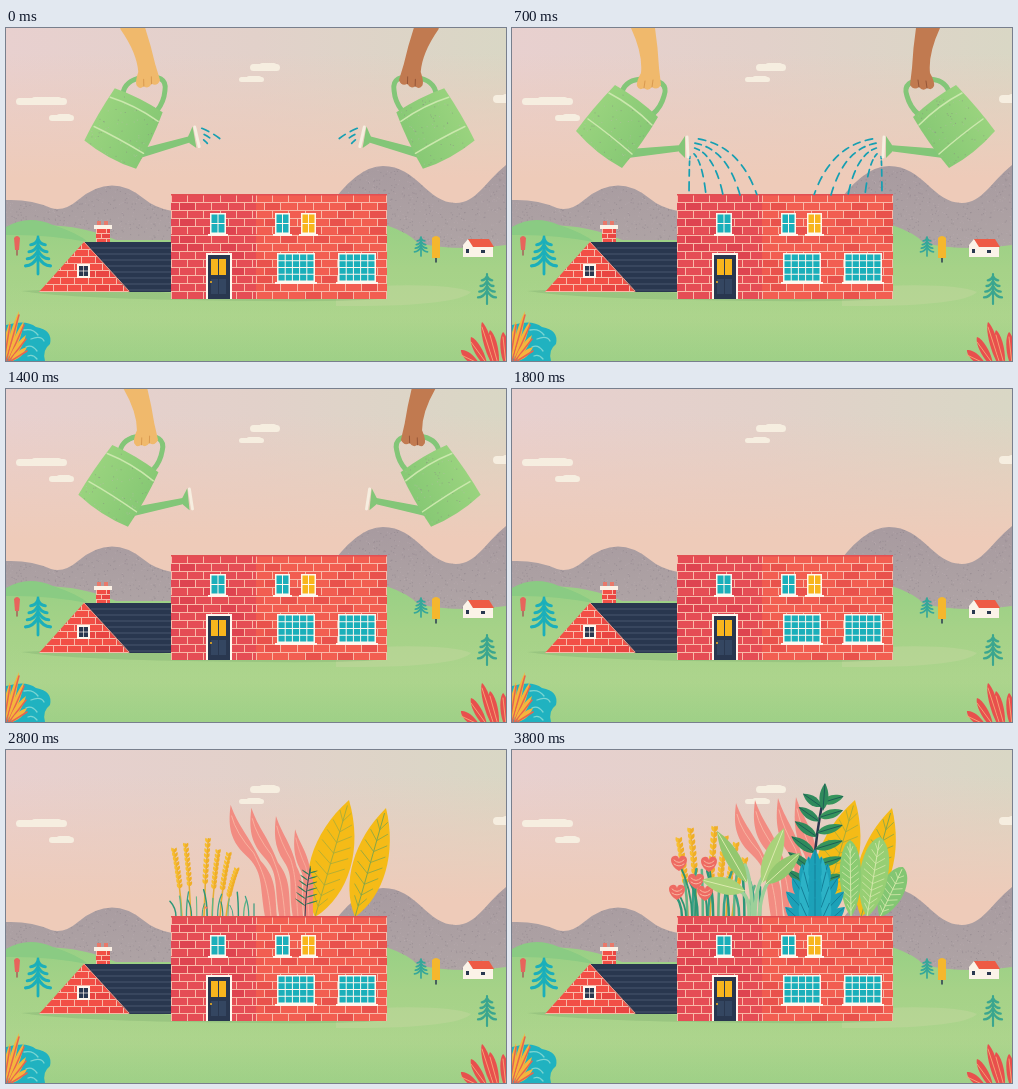
These frames come from a looping animation (500x333 px, 5.8 s). An HTML page with a canvas:

```html
<!DOCTYPE html>
<html lang="en">
<head>
<meta charset="utf-8">
<title>Rooftop garden</title>
<style>
html, body { margin: 0; width: 100%; height: 100%; overflow: hidden; }
canvas { display: block; width: 500px; height: 333px; }
</style>
</head>
<body>
<canvas id="stage" width="500" height="333"></canvas>
<script>
const c = document.getElementById('stage').getContext('2d');
const LOOP = 5800, STEP = 100, ROOF = 167;
const TEAL = '#1bafba', NAVY = '#29374f', CREAM = '#f6eee0', RED = '#f04a43';
let seed = 1;
const rand = () => (seed = seed * 16807 % 2147483647) / 2147483647;

const fill = (d, color) => { c.fillStyle = color; c.fill(new Path2D(d)); };
const line = (d, color, w = 1) => {
  c.strokeStyle = color; c.lineWidth = w; c.lineCap = 'round'; c.stroke(new Path2D(d));
};
const rect = (x, y, w, h, color) => { c.fillStyle = color; c.fillRect(x, y, w, h); };
const group = fn => { c.save(); fn(); c.restore(); };
const gradient = (x0, y0, x1, y1, ...stops) => {
  const g = c.createLinearGradient(x0, y0, x1, y1);
  stops.forEach((s, i) => g.addColorStop(i / (stops.length - 1), s));
  return g;
};
const grain = (d, x, y, w, h, n) => group(() => {
  c.clip(new Path2D(d));
  for (let i = 0; i < n; i++)
    rect(x + rand() * w, y + rand() * h, 1, 1, rand() < .5 ? '#c3b5b866' : '#83798266');
});

// ---- Landscape ----
function clouds() {
  for (const [x, y, w, h] of [[10, 69, 51, 8], [43, 86, 25, 7], [244, 35, 30, 8], [233, 48, 25, 6], [487, 66, 30, 9]]) {
    c.fillStyle = CREAM;
    c.beginPath();
    c.roundRect(x, y + 1, w, h - 1, h / 2);
    c.roundRect(x + w * .3, y, w * .6, h - 1, h / 2);
    c.fill();
  }
}

function pine(x, top, h, w, color = TEAL) {
  line(`M${x} ${top}V${top + h}`, color, w / 11 + .5);
  for (let i = 1; i < 5; i++) {
    const y = top + h * (.02 + i * .19), r = w * (.22 + i * .07);
    line(`M${x - r} ${y}Q${x - r * .4} ${y} ${x} ${y - r * .75}Q${x + r * .4} ${y} ${x + r} ${y}`, color, w / 9 + .3);
  }
}

function landscape() {
  rect(0, 0, 500, 333, gradient(0, 0, 500, 0, '#e8d0cf', '#e2d1ca', '#d9d7c5'));
  rect(0, 0, 500, 333, gradient(0, 25, 0, 150, '#eecbba00', '#eecbba88', '#eecbb9'));
  clouds();

  const hills = 'M0 172Q25 171 45 180Q58 184 72 172Q105 144 137 170Q149 180 166 183H320Q350 138 377 138C411 138 421 175 450 175C470 175 478 155 500 137V235H0Z';
  fill(hills, gradient(0, 140, 0, 225, '#a89ba0', '#afa4a5'));
  grain(hills, 0, 137, 500, 95, 2600);

  fill('M0 201Q60 190 110 212H380V197Q403 205 412 215Q450 224 500 217V333H0Z',
    gradient(0, 195, 0, 333, '#98d085', '#a6d288', '#a9d48b', '#9fd087'));
  fill('M0 199Q22 186 47 197Q72 205 82 214Q40 206 0 207Z', '#8acb83');
  rect(0, 200, 500, 133, gradient(0, 255, 0, 333, '#b5d59000', '#b5d59055', '#a4d28a00'));
  fill('M330 260Q440 253 465 264Q450 279 330 278Z', '#c3d69f77');
  fill('M15 263Q90 257 165 265L381 270Q350 275 180 272Q60 270 15 263Z', '#7fae7066');

  line('M11 215V227', '#a65f57', 1.5);
  fill('M8 210Q11 206 14 210L13 222H9Z', '#e7645c');
  pine(32, 209, 37, 25);
  pine(415, 209, 19, 13, '#35a79a');
  pine(481, 246, 30, 18, '#3ba68f');
  line('M430 225V234', NAVY, 1.5);
  fill('M426 210Q430 206 434 210V230H426Z', '#f5b72d');

  fill('M457 229V217L462 211L467 217H487V229Z', '#fbf3e8');
  fill('M462 211H483L488 219H467Z', '#ee5b45');
  rect(460, 221, 3, 4, NAVY);
  rect(475, 222, 4, 3, NAVY);

  fill('M0 297Q20 291 30 299Q47 302 44 316Q36 322 39 333H0Z', '#20b2c0');
  line('M18 302Q27 300 32 307M25 311Q35 307 38 313M20 319Q26 316 31 323M22 328Q27 326 31 331', '#7bd5d2', 1.3);
  for (const [x, y, lean] of [[13, 283, 13], [18, 293, 16], [20, 307, 17], [21, 319, 16], [4, 293, 6]]) {
    leaf(x - lean, 333, x, y, 5, '#f5b53c');
    line(`M${x - lean} 333L${x} ${y + 4}`, '#e7644f', 1.5);
  }
  for (const [x, y, b] of [[476, 294, 488], [484, 302, 492], [465, 309, 481], [497, 304, 500], [455, 322, 474]]) {
    leaf(b, 339, x, y, 7, '#e8504d', null, 0, .85);
    line(`M${b} 336L${x} ${y + 5}`, '#f4a073');
  }
}

// ---- House ----
function bricks(d, color, x0, y0, w, h, row) {
  group(() => {
    c.clip(new Path2D(d));
    rect(x0, y0, w, h, color);
    for (let r = 0; r * row < h; r++) {
      const y = Math.round(y0 + r * row);
      for (let x = x0 + (r % 2 ? row : 0); x < x0 + w; x += row * 2) {
        rect(x, y, row * 2, row, rand() < .2 ? '#c8304030' : '#ff806018');
        rect(Math.round(x), y, 1, row, '#f9b9a8');
      }
      rect(x0, y, w, 1, '#f9b9a8');
    }
  });
}

function pane(x, y, w, h, cols, rows, color) {
  rect(x, y, w, h, '#fff7ee');
  const pw = (w - 2) / cols, ph = (h - 2) / rows;
  for (let i = 0; i < cols * rows; i++)
    rect(x + 1.5 + i % cols * pw, y + 1.5 + Math.floor(i / cols) * ph, pw - 1, ph - 1, color);
  rect(x - 2, y + h, w + 4, 2, '#fff7ee');
}

function house() {
  fill('M78 214H165V264H123Z', NAVY);
  for (let y = 220; y < 263; y += 6) line(`M${80 + (y - 214) * .9} ${y}H165`, '#55647a', .7);
  bricks('M78 214L33 264H123Z', RED, 33, 214, 90, 50, 7);
  line('M78 214L123 263', '#f3978a', 1);
  rect(71, 236, 13, 14, '#fff7ee');
  rect(73, 238, 9, 10, NAVY);
  line('M77.5 238V248M73 243H82', '#fff7ee', .7);
  bricks('M90 200H104V214H90Z', RED, 90, 200, 14, 14, 5);
  rect(88, 197, 18, 4, '#fbf1e5');
  rect(91, 193, 4, 4, '#e9796a');
  rect(98, 193, 4, 4, '#e9796a');

  bricks('M165 166H250V271H165Z', '#e24854', 165, 166, 85, 105, 8.1);
  bricks('M250 166H381V271H250Z', '#f05a4f', 250, 166, 131, 105, 8.1);
  rect(165, 166, 216, 1.5, '#e24f52');
  pane(204, 185, 16, 21, 2, 2, TEAL);
  pane(269, 185, 15, 21, 2, 2, TEAL);
  pane(295, 185, 15, 21, 2, 2, '#f8b51d');
  pane(271, 225, 38, 29, 5, 4, TEAL);
  pane(332, 225, 38, 29, 5, 4, TEAL);
  rect(200, 225, 26, 46, '#fff7ee');
  rect(202, 227, 22, 44, NAVY);
  rect(205, 231, 7, 16, '#f8b51d');
  rect(213, 231, 7, 16, '#f8b51d');
  rect(205, 251, 7, 15, '#344661');
  rect(213, 251, 7, 15, '#344661');
  c.fillStyle = '#f8b51d';
  c.beginPath(); c.arc(205, 254, 1, 0, 7); c.fill();
}

// ---- Plants, each drawn about its root ----
function leaf(x0, y0, x1, y1, w, color, vein, ribs = 0, round = .65) {
  const dx = x1 - x0, dy = y1 - y0, len = Math.hypot(dx, dy);
  const at = (t, s) => `${x0 + dx * t - dy / len * w * s} ${y0 + dy * t + dx / len * w * s}`;
  fill(`M${at(0, 0)}C${at(.25, .75)} ${at(round, .75)} ${at(1, 0)}C${at(round, -.75)} ${at(.25, -.75)} ${at(0, 0)}`, color);
  if (!vein) return;
  line(`M${at(0, 0)}L${at(.95, 0)}`, vein, 1);
  for (let i = 1; i <= ribs; i++) {
    const t = i / (ribs + 2), s = .85 * Math.sin(Math.PI * Math.min(1, t + .06)) * .5;
    line(`M${at(t + .08, s)}L${at(t, 0)}L${at(t + .08, -s)}`, vein, .8);
  }
}

function grow(t, start, span, x, draw) {
  const p = Math.min(1, (t - start) / span);
  if (p <= 0) return;
  group(() => {
    const s = Math.sin(p * Math.PI / 2);
    c.translate(x, ROOF);
    c.scale(s, s);
    draw(p);
  });
}

function frond(dx, h) {
  fill(`M-6 0C-12 ${-h * .3} ${dx * .2 + 1} ${-h * .4} ${dx * .6 - 1} ${-h * .55}C${dx - 3} ${-h * .7} ${dx - 2} ${-h * .85} ${dx} ${-h}` +
    `C${dx + 8} ${-h * .8} ${dx + 17} ${-h * .75} ${dx * .6 + 14} ${-h * .5}C${dx * .2 + 13} ${-h * .35} 4 ${-h * .25} 6 0Z`, '#f28c82');
  line(`M0 0C-3 ${-h * .3} ${dx * .4 + 8} ${-h * .4} ${dx * .6 + 7} ${-h * .57}Q${dx + 5} ${-h * .75} ${dx + 1} ${-h * .9}`, '#f8b3a1', 1);
}

function wheat(dx, h) {
  line(`M0 0Q${dx * .2} ${-h * .5} ${dx} ${-h}`, '#e5ad35', 1.8);
  for (let k = 0; k < 9; k++) {
    const u = .42 + k * .066, x = dx * (.4 * u * (1 - u) + u * u), y = -h * u;
    leaf(x, y, x - 3, y - 6, 3, '#f7be2f');
    leaf(x, y, x + 3, y - 6, 3, '#f0ae27');
  }
}

// The narrow leaflets open once the stem is nearly up.
function fern(p) {
  const w = 3 + 5 * Math.max(0, p - .6) / .4;
  line('M0 0Q2 -75 14 -126', NAVY, 2.5);
  for (let i = 0; i < 6; i++) {
    const u = .2 + i * .13, x = 4 * u + 10 * u * u, y = -150 * u * (1 - u) - 126 * u * u, r = 32 - i * 2;
    leaf(x, y, x - r * .85, y - r * .6, w, '#2f8a5c', '#1e5d55');
    leaf(x, y - 4, x + r, y - 4 - r * .3, w, '#36945c', '#1e5d55');
  }
  leaf(12, -107, 14, -134, w, '#2f8a5c', '#1e5d55');
}

function sprout(p) {
  const a = '#a9d27a', b = '#93c76f', v = '#dcebae';
  line('M-2 0Q-4 -40 -10 -52M0 0Q0 -30 9 -42M4 0Q6 -25 14 -36M-6 0Q-5 -24 -18 -27', '#9cd09a', 3.5);
  leaf(-8, -34, -38, -86, 13 * p, b, v);
  leaf(7, -34, 29, -89, 15 * p, a, v);
  leaf(11, -33, 45, -64, 14 * p, b, v);
  leaf(-10, -26, -53, -37, 15 * p, a, v);
}

function agave() {
  for (const [y, r, h] of [[-36, 13, 32], [-22, 23, 32], [-10, 29, 28], [2, 30, 22]]) {
    for (const k of [-1, 1, -.5, .5, 0])
      leaf(k * 5, y + 10, k * r, y - h * (1 - Math.abs(k) * .45), 12, k % 1 ? '#2cb2c6' : '#1ca1b8', '#137f98');
  }
}

function heartFlower(dx, h) {
  line(`M0 0Q0 ${-h * .5} ${dx} ${-h}`, '#2d9573', 1.8);
  group(() => {
    c.translate(dx, -h);
    fill('M0 8C-9 3 -10 -6 -5 -7Q-1 -8 0 -4Q1 -8 5 -7C10 -6 9 3 0 8Z', '#ee6a62');
    line('M-5 -3Q0 2 5 -3M-5 1Q0 5 5 1', '#f8b6a0', 1);
  });
}

function plants(t) {
  const gold = '#f5bb17', goldVein = '#a8ad3a';
  grow(t, 1900, 550, 309, () => leaf(0, 0, 34, -117, 36, gold, goldVein, 9));
  grow(t, 2050, 650, 349, () => leaf(0, 0, 31, -109, 30, gold, '#84a64a', 8));
  [[265, -41, 114], [279, -36, 117], [292, -26, 119], [303, -19, 120]].forEach(([x, dx, h], i) =>
    grow(t, 2000 + i * 110, 900, x, () => frond(dx, h)));
  grow(t, 2600, 800, 299, fern);
  const pale = '#d3e8aa';
  grow(t, 2900, 600, 368, () => leaf(0, 0, 23, -50, 21, '#83c673', pale, 7, .9));
  grow(t, 2950, 600, 355, () => leaf(0, 0, 13, -80, 25, '#97cf74', pale, 10, .9));
  grow(t, 2950, 600, 339, () => leaf(0, 0, -1, -77, 19, '#8acb72', pale, 10, .9));

  [[176, -10, 78], [185, -7, 88], [198, 5, 90], [206, 8, 80], [214, 11, 73], [220, 14, 57]].forEach(([x, dx, h], i) =>
    grow(t, 2230 + i % 2 * 40, 850, x, () => wheat(dx, h)));
  for (let i = 0; i < 16; i++)
    grow(t, 2510 + i * 23 % 130, 700, 170 + i * 5.2, () => {
      const lean = i * 7 % 19 - 10, h = 26 + i * 11 % 23;
      line(`M0 0Q0 ${-h * .6} ${lean} ${-h}`, ['#2c9779', '#61b588', '#39a287'][i % 3], 2.5);
    });
  [[201, -4, 53, 2750], [180, -13, 54, 3200], [183, 1, 36, 3300], [174, -9, 25, 3250], [195, -2, 24, 3350]].forEach(([x, dx, h, s]) =>
    grow(t, s, 450, x, () => heartFlower(dx, h)));
  grow(t, 2950, 700, 243, sprout);
  grow(t, 3000, 700, 303, agave);
}

// ---- Watering cans ----
function water(t, tilt) {
  const head = .18 + t / 100 * .22, tail = (t - 1150) / 250;
  c.translate(177, 118);
  c.rotate(tilt * .5);
  c.translate(-177, -118);
  for (let i = 0; i < 5; i++) {
    const x0 = 178, y0 = 110 + i * 4.5, x2 = 245 - i * 17, y2 = 167;
    const x1 = x0 + (x2 - x0) * .72, y1 = y0 + 3;
    const at = u => {
      const v = 1 - u;
      return `${v * v * x0 + 2 * u * v * x1 + u * u * x2} ${v * v * y0 + 2 * u * v * y1 + u * u * y2}`;
    };
    const gap = .145 + i * .025;
    for (let u = (t / 100 * .22 + i * .06) % gap; u < .97; u += gap)
      if (u < head && u > tail) line(`M${at(u)}L${at(u + gap * .28)}L${at(Math.min(1, u + gap * .56))}`, '#159fb2', 1.7);
  }
}

function can(t, skin, shade) {
  const back = Math.min(1, Math.max(0, (t - 1250) / 250));
  const tilt = Math.max(0, 1 - t / 300) ** 1.4 + back;
  const lift = 200 * Math.max(0, (t - 1350) / 400) ** 2;
  c.translate(140 + 4 * tilt, 50 - 3 * tilt - lift);
  c.rotate(-tilt * Math.PI / 18);
  c.translate(-140, -50);
  group(() => water(t, tilt));
  line('M110 64Q114 51 132 51Q158 52 152 68Q149 79 141 86', '#83c678', 5);
  fill('M118 121L170 117V123L116 130Z', '#83c678');
  fill('M167 117L173 108V130L167 124Z', '#83c678');
  line('M175 109L176 129', CREAM, 3);
  const body = 'M103 57Q126 70 146 89Q131 115 110 140Q84 126 64 103Q80 81 103 57Z';
  fill(body, gradient(75, 80, 130, 120, '#9bd47f', '#86c874'));
  grain(body, 64, 57, 82, 83, 120);
  line('M97 65Q120 77 140 97M76 91Q97 106 120 126', '#cbe8ad', 1.5);
  fill('M80 -240H124L143 0Q146 20 147 40L149 57Q145 63 140 59Q136 64 132 60Q127 63 125 58Q124 54 129 45Q131 26 119 0Z', skin);
  line('M132 60L133 53M140 59L141 52', shade, 1);
}

function draw(t) {
  seed = 7;
  landscape();
  plants(t);
  house();
  if (t < 1800) {
    group(() => can(t, '#f0b96c', '#d99a50'));
    group(() => { c.translate(547, 0); c.scale(-1, 1); can(t, '#c17a50', '#965638'); });
  }
}

const begin = performance.now();
let shown = -1;
function tick() {
  const t = Math.floor((performance.now() - begin) % LOOP / STEP) * STEP;
  if (t !== shown) draw(shown = t);
  requestAnimationFrame(tick);
}
tick();
</script>
</body>
</html>
```
